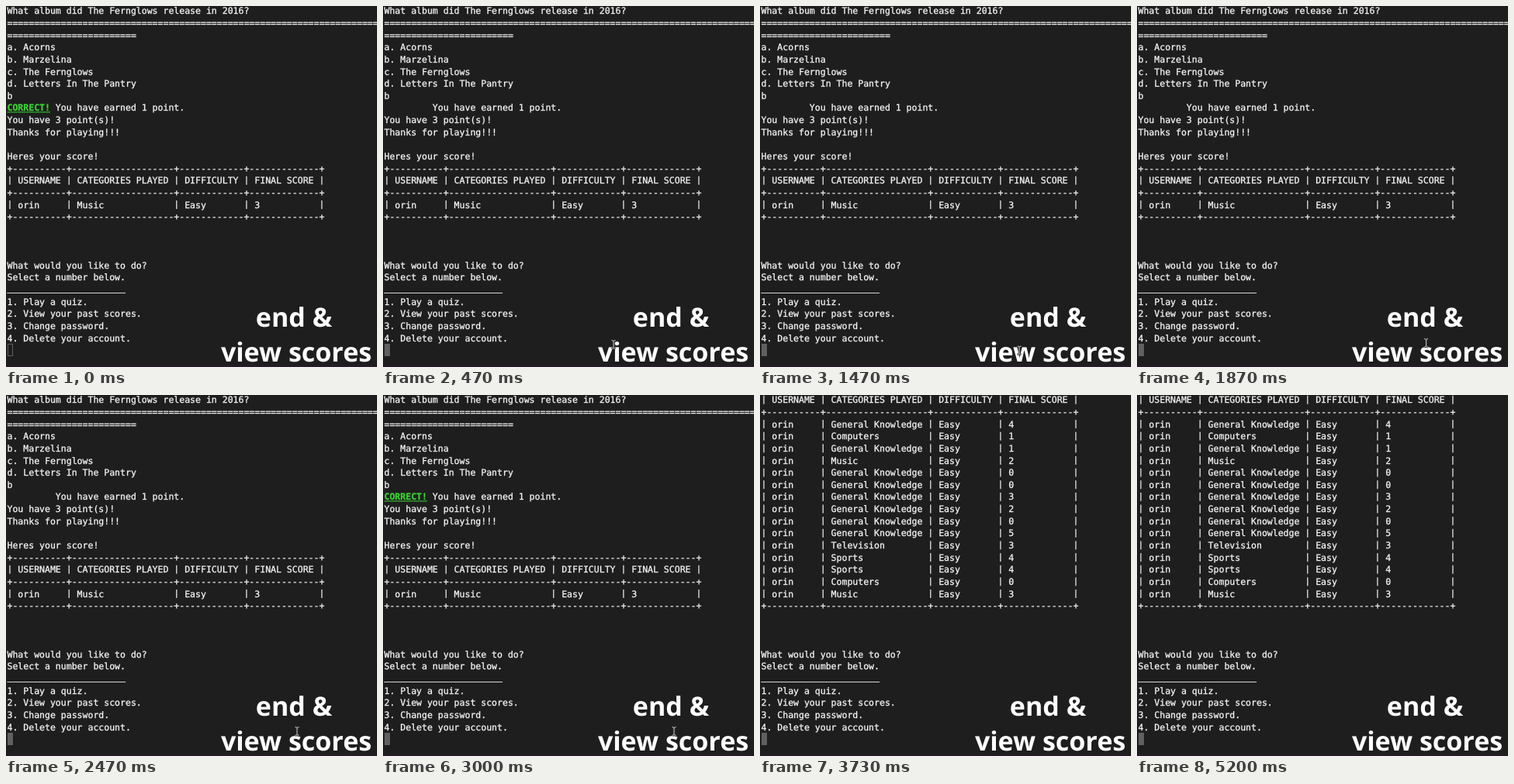
Recreate the animation shown at these times as an HTML page with a canvas. Size 478 by 466 pixels, loop 8 s.

```html
<!DOCTYPE html>
<html lang="en">
<head>
<meta charset="utf-8">
<title>Quiz terminal</title>
<style>
html, body { margin: 0; width: 100%; height: 100%; overflow: hidden; background: #1e1e1e; }
canvas { display: block; }
</style>
</head>
<body>
<canvas id="stage" width="478" height="466"></canvas>
<script>
const ctx = document.getElementById("stage").getContext("2d");
const LOOP = 8000, LEFT = 1.5, BASE = 10.3, CELL = 6.93, ROW = 15.64;
const MONO = '11.5px "DejaVu Sans Mono", monospace';
const USER = "orin";

const widths = [8, 17, 10, 11];
const rule = "+" + widths.map(w => "-".repeat(w + 2) + "+").join("");
const tableRow = cells => "| " + cells.map((c, i) => String(c).padEnd(widths[i])).join(" | ") + " |";
const header = tableRow(["USERNAME", "CATEGORIES PLAYED", "DIFFICULTY", "FINAL SCORE"]);
const score = (category, points) => tableRow([USER, category, "Easy", points]);

const menu = [
  "", "", "",
  "What would you like to do?",
  "Select a number below.",
  "_".repeat(22),
  "1. Play a quiz.",
  "2. View your past scores.",
  "3. Change password.",
  "4. Delete your account."
];

const quizScreen = [
  "What album did The Fernglows release in 2016?",
  "=".repeat(69),
  "=".repeat(24),
  "a. Acorns",
  "b. Marzelina",
  "c. The Fernglows",
  "d. Letters In The Pantry",
  "b",
  "         You have earned 1 point.",
  "You have 3 point(s)!",
  "Thanks for playing!!!",
  "",
  "Heres your score!",
  rule, header, rule, score("Music", 3), rule,
  ...menu
];

const GK = "General Knowledge";
const history = [
  [GK, 4], ["Computers", 1], [GK, 1], ["Music", 2], [GK, 0],
  [GK, 0], [GK, 3], [GK, 2], [GK, 0], [GK, 5],
  ["Television", 3], ["Sports", 4], ["Sports", 4], ["Computers", 0], ["Music", 3]
];
const scoreScreen = [header, rule, ...history.map(h => score(...h)), rule, ...menu];

// Each character sits in its own terminal cell; bars are short, underscores high.
function print(text, row) {
  const y = BASE + row * ROW;
  [...text].forEach((ch, i) => {
    const x = LEFT + i * CELL;
    if (ch === "|") {
      ctx.fillRect(x + CELL / 2 - 0.6, y - 9.5, 1.2, 11);
    } else if (ch !== " ") {
      const lift = ch === "_" ? 2 : 0;
      ctx.fillText(ch, x, y - lift);
      ctx.strokeText(ch, x, y - lift);
    }
  });
}

function setPen(font, color) {
  ctx.font = font;
  ctx.fillStyle = ctx.strokeStyle = color;
  ctx.lineWidth = 0.3;
}

function drawVerdict() {
  setPen("bold " + MONO, "#3bd433");
  print("CORRECT!", 8);
  ctx.fillRect(LEFT, 136.5, 8 * CELL, 1);
}

function drawCursor(col, focused) {
  const x = Math.round(LEFT + col * CELL);
  if (focused) {
    ctx.fillStyle = "#606060";
    ctx.fillRect(x, 436, 7, 16);
  } else {
    ctx.strokeStyle = "#606060";
    ctx.lineWidth = 1;
    ctx.strokeRect(x + 0.5, 436.5, 6, 15);
  }
}

function drawCaption() {
  ctx.font = '700 34px "Open Sans", "Noto Sans", sans-serif';
  ctx.fillStyle = "#fff";
  ctx.textAlign = "center";
  ctx.fillText("end &", 371, 414);
  ctx.fillText("view scores", 374, 459);
  ctx.textAlign = "left";
}

function drawPointer(t) {
  const p = Math.min(1, Math.max(0, (t - 1270) / 730));
  const ease = 1 - (1 - p) ** 2;
  const x = 297 + 78 * ease;
  const y = 437 - 3 * ease + 9 * Math.sin(Math.PI * ease);
  ctx.beginPath();
  for (const side of [-1, 1]) {
    ctx.moveTo(x - 2.5, y + side * 5.5);
    ctx.lineTo(x, y + side * 4.5);
    ctx.lineTo(x + 2.5, y + side * 5.5);
  }
  ctx.moveTo(x, y - 4.5);
  ctx.lineTo(x, y + 4.5);
  for (const [color, width] of [["#333", 2.6], ["#bbb", 1]]) {
    ctx.strokeStyle = color;
    ctx.lineWidth = width;
    ctx.stroke();
  }
}

function draw(t) {
  const quiz = t < 3730, typed = t >= 3130 && quiz;
  ctx.fillStyle = "#1e1e1e";
  ctx.fillRect(0, 0, 478, 466);
  ctx.fillStyle = "#271b29";
  ctx.fillRect(0, 464, 478, 2);

  ctx.textRendering = "geometricPrecision";
  setPen(MONO, "#f4f4f4");
  (quiz ? quizScreen : scoreScreen).forEach(print);
  if (typed) print("2", 28);

  const blink = (t + 70) % 1000;
  if (quiz && blink < 540) drawVerdict();
  drawCursor(typed ? 1 : 0, t >= 130);
  drawCaption();
  if (t >= 200 && t < 3130) drawPointer(t);
}

const start = performance.now();
function frame() {
  draw((performance.now() - start) % LOOP);
  requestAnimationFrame(frame);
}
frame();
</script>
</body>
</html>
```
